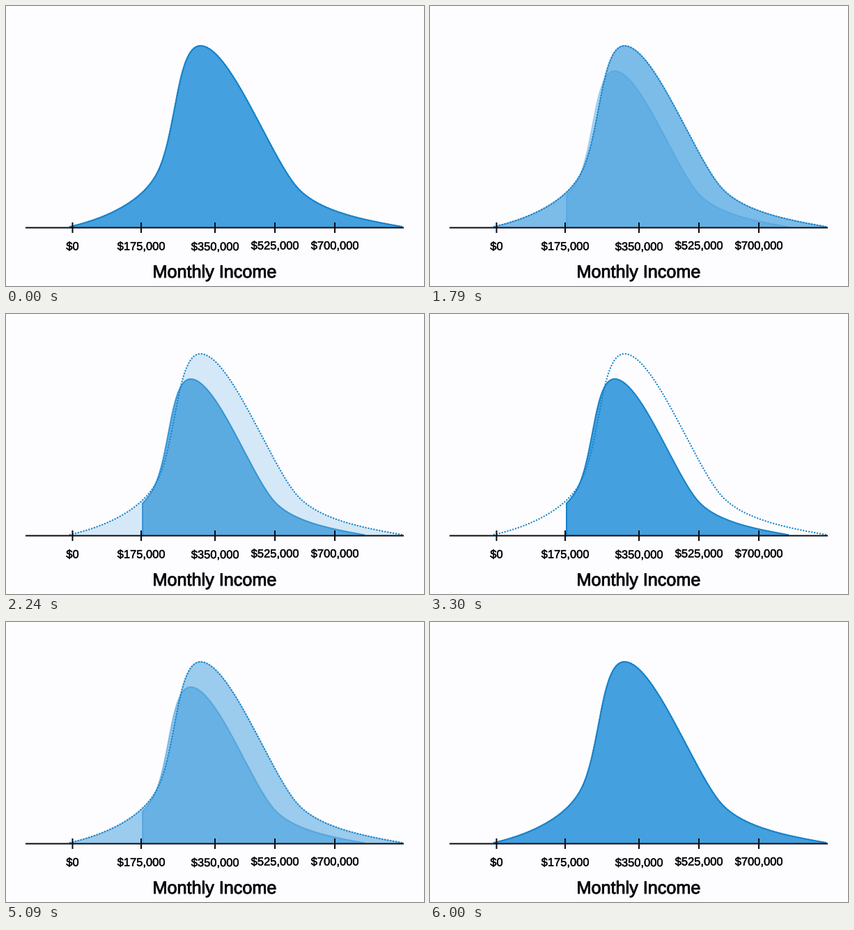
Recreate the animation shown at these times as a matplotlib script. Size 600x401 px, loop 6.03 s.

```python
import numpy as np
import matplotlib.pyplot as plt
from matplotlib.animation import FuncAnimation
from matplotlib.patches import PathPatch, Rectangle
from matplotlib.path import Path
from matplotlib.patheffects import Normal, Stroke

W, H, DPI = 600, 401, 64
STEP, LOOP = 30, 6030
PX = 72 / DPI  # points per pixel

BACK = "#fdfdff"
FILL = "#44a0de"
LINE = "#1682ca"
INK = "#0a0a0e"

BASE = 317.5
PEAK_X, SMALL_PEAK_X = 279, 265
CUT_X = 196
SCALE = 0.8616

# Cubic segments of the income curve: start, then two handles and an end each.
CURVE = np.array([
    (92, 316),
    (140, 305), (190, 283), (213, 246),
    (245, 197), (243, 57), (279, 57),
    (320, 57), (375, 205), (414, 255),
    (442, 292), (505, 305), (568, 316),
], float)

SHRINK, GROW, FADE = 1345, 4445, 1350  # fade starts and length, ms

fig = plt.figure(figsize=(W / DPI, H / DPI), dpi=DPI, facecolor=BACK)
ax = fig.add_axes([0, 0, 1, 1])
ax.set_xlim(0, W)
ax.set_ylim(H, 0)
ax.axis("off")


def ease(t, start):
    """Smooth rise from 0 to 1 that slows down towards its end."""
    u = np.clip((t - start) / FADE, 0, 1)
    return np.sin(np.pi / 2 * u ** 0.85) ** 2


def sample(points, n=60):
    """Points along a chain of cubic segments."""
    t = np.linspace(0, 1, n)[:, None]
    parts = []
    for i in range(0, len(points) - 1, 3):
        a, b, c, d = points[i:i + 4]
        parts.append((1 - t) ** 3 * a + 3 * (1 - t) ** 2 * t * b
                     + 3 * (1 - t) * t ** 2 * c + t ** 3 * d)
    return np.vstack(parts)


def add_area(top, edge):
    """Filled area under a curve, with a separate outline."""
    corners = [(top[-1, 0], BASE), (top[0, 0], BASE)]
    area = PathPatch(Path(np.vstack([top, corners])), fc=FILL, ec="none",
                     zorder=1)
    ax.add_patch(area)
    outline, = ax.plot(*edge.T, color=LINE, lw=2 * PX, zorder=1,
                       solid_joinstyle="miter")
    return area, outline


def fade(shape, alpha):
    """The outline lies over its own fill, so it fades faster."""
    area, outline = shape
    area.set_alpha(alpha)
    outline.set_alpha(alpha ** 2)


def add_bar(x, y, w, h):
    ax.add_patch(Rectangle((x, y), w, h, fc=INK, ec="none", snap=False,
                           zorder=3))


def add_text(x, y, text, size, weight):
    label = ax.text(x, y, text, family="Liberation Sans", fontsize=size * PX,
                    color=INK, ha="center", va="baseline", zorder=4)
    label.set_path_effects([Stroke(linewidth=weight * PX, foreground=INK),
                            Normal()])


big = sample(CURVE)
small = (big - (PEAK_X, BASE)) * SCALE + (SMALL_PEAK_X, BASE)
cut_y = np.interp(CUT_X, small[:, 0], small[:, 1])
small = np.vstack([(CUT_X, cut_y), small[small[:, 0] > CUT_X]])

before = add_area(big, big)
after = add_area(small, np.vstack([(CUT_X, BASE), small]))

ax.plot(*big.T, color=LINE, lw=2.4 * PX, ls=(0, (0.01, 1.67)),
        dash_capstyle="round", zorder=2)

# Axis line, then each tick with the baseline of its label.
add_bar(28, BASE - 1, 543, 2)
TICKS = [(95.5, 349.5), (194, 349.5), (300, 350), (386, 348.5), (472, 348.5)]
for i, (x, y) in enumerate(TICKS):
    add_bar(x - 1, 310, 2, 15)
    add_text(x, y, f"\\${175_000 * i:,}", 16.5, 0.5)
add_text(299.7, 389, "Monthly Income", 25.2, 0.9)


def draw(i):
    t = i * STEP
    share = ease(t, SHRINK) - ease(t, GROW)
    fade(before, 1 - share)
    fade(after, share ** 0.7)
    return before + after


anim = FuncAnimation(fig, draw, frames=LOOP // STEP, interval=STEP,
                     repeat=True, repeat_delay=0, blit=False)
plt.show()
```
